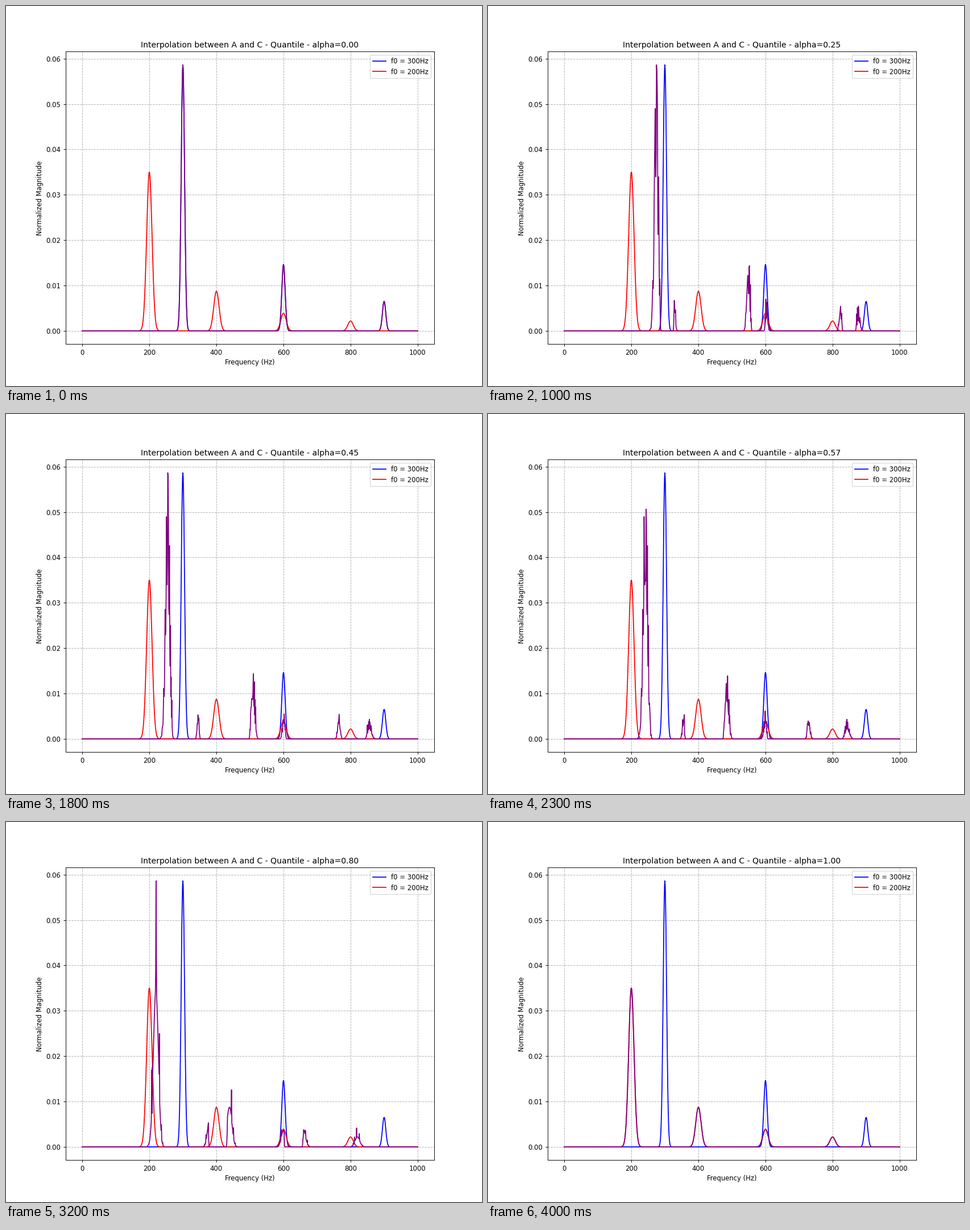
Recreate the animation shown at these times as a matplotlib script. Size 837x669 px, loop 4100 ms.

```python
import numpy as np
import matplotlib.pyplot as plt
from matplotlib.animation import FuncAnimation

STEPS = 40
freq = np.arange(1001)


def spectrum(f0, sigma):
    """Normalized Gaussian harmonics below 1 kHz, decaying as 1/k^2."""
    mags = sum(np.exp(-0.5 * ((freq - k * f0) / sigma) ** 2) / k**2
               for k in range(1, 10) if k * f0 < 1000)
    return mags / mags.sum()


def transport_plan(p, q):
    """Monotone coupling of p and q: source bins, target bins, masses."""
    cp, cq = np.cumsum(p), np.cumsum(q)
    levels = np.concatenate(([0], np.sort(np.concatenate((cp, cq)))))
    mids = (levels[1:] + levels[:-1]) / 2
    last = len(p) - 1
    src = np.minimum(np.searchsorted(cp, mids), last)
    dst = np.minimum(np.searchsorted(cq, mids), last)
    return src, dst, np.diff(levels)


spec_a = spectrum(300, 5)
spec_c = spectrum(200, 8)
src, dst, mass = transport_plan(spec_a, spec_c)


def interpolate(alpha):
    bins = ((1 - alpha) * src + alpha * dst).astype(int)
    return np.bincount(bins, weights=mass, minlength=len(freq))


# 837 x 669 pixels
fig, ax = plt.subplots(figsize=(10, 7.993), dpi=83.7)
ax.plot(freq, spec_a, color="blue", label="f0 = 300Hz")
ax.plot(freq, spec_c, color="red", label="f0 = 200Hz")
blend, = ax.plot(freq, spec_a, color="purple")
ax.set_xlabel("Frequency (Hz)")
ax.set_ylabel("Normalized Magnitude")
ax.grid(True, linestyle="--")
ax.legend(loc="upper right")
title = ax.set_title("")


def update(i):
    alpha = i / STEPS
    blend.set_ydata(interpolate(alpha))
    title.set_text(f"Interpolation between A and C - Quantile - alpha={alpha:.2f}")
    return blend, title


anim = FuncAnimation(fig, update, frames=STEPS + 1, interval=100,
                     repeat=True, repeat_delay=0, blit=False)
plt.show()
```
